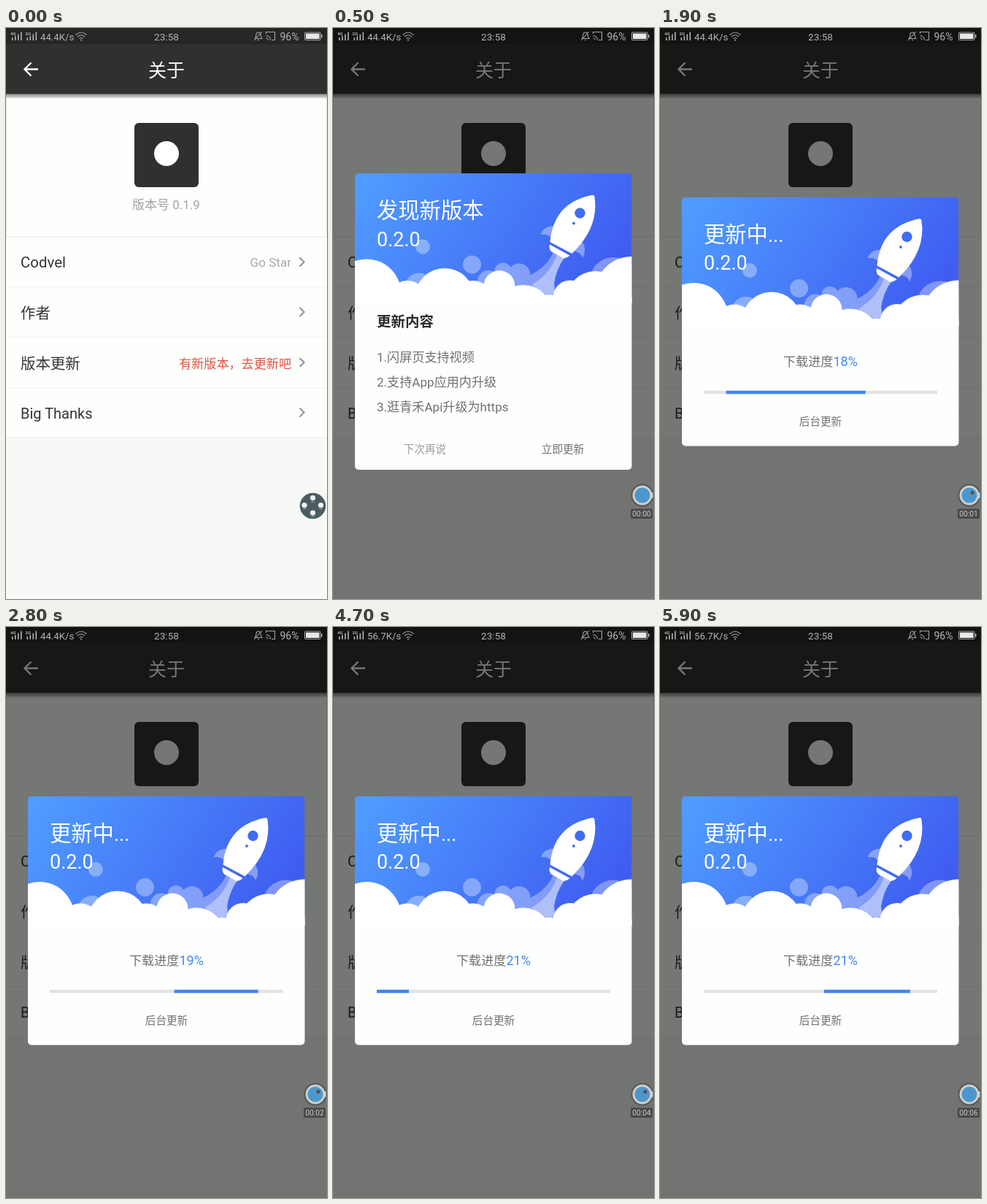
These frames come from a looping animation (440 px wide and 782 px high, 6000 ms). An HTML page:

```html
<!DOCTYPE html>
<html lang="zh-CN">
<head>
<meta charset="utf-8">
<title>关于</title>
<style>
  html, body { margin: 0; width: 100%; height: 100%; overflow: hidden; background: #f7f9f6; }
  svg { display: block; width: 440px; height: 782px; }
  text { font-family: Roboto, "Noto Sans CJK SC", "Noto Sans CJK", sans-serif; white-space: pre; }
  .row { font-size: 20.4px; fill: #333; }
  .note { font-size: 17.1px; }
  .head { font-size: 29.3px; font-weight: 300; fill: #fff; }
  .num { font-size: 27px; font-weight: 400; fill: #fff; }
  .body { font-size: 17.1px; fill: #707070; }
  .btn { font-size: 14.6px; fill: #707070; text-anchor: middle; }
  .status { fill: #b4b4b2; font-size: 13.2px; }
  .tiny { font-size: 6px; font-weight: 700; }
  .end { text-anchor: end; }
  .mid { text-anchor: middle; }
</style>
</head>
<body>
<svg viewBox="0 0 440 782">
  <defs>
    <linearGradient id="sky" x1="0" y1="0.2" x2="1" y2="0.5">
      <stop offset="0" stop-color="#4f9bff"/>
      <stop offset="1" stop-color="#3f5df1"/>
    </linearGradient>
    <linearGradient id="shade" x1="0" y1="0" x2="0" y2="1">
      <stop offset="0" stop-color="#000" stop-opacity=".48"/>
      <stop offset="1" stop-color="#000" stop-opacity="0"/>
    </linearGradient>
    <clipPath id="headClip"><path d="M30 376V204a5 5 0 0 1 5-5H404.500a5 5 0 0 1 5 5V376z"/></clipPath>
    <clipPath id="trackClip"><rect x="60" y="496.500" width="320" height="5"/></clipPath>
    <path id="chevron" d="M402.500 -6l6 6l-6 6" fill="none" stroke="#999" stroke-width="2.300"/>
    <g id="bars">
      <rect y="13" width="1.600" height="4"/>
      <rect x="4" y="11" width="1.600" height="6"/>
      <rect x="8" y="8.500" width="1.600" height="8.500"/>
      <rect x="12" y="5.500" width="1.600" height="11.500"/>
    </g>
    <g id="banner" clip-path="url(#headClip)">
      <rect x="30" y="199" width="379.500" height="170" fill="url(#sky)"/>
      <g fill="#fff" opacity=".34">
        <circle cx="123" cy="299.500" r="10"/>
        <circle cx="190.500" cy="324" r="12.500"/>
        <circle cx="118" cy="355" r="19.500"/>
        <circle cx="213" cy="347" r="15"/>
        <circle cx="233" cy="333" r="11.500"/>
        <circle cx="255" cy="338" r="15.500"/>
        <circle cx="384" cy="346" r="32"/>
        <path d="M302 307Q290 335 250 346L262 362L297 368Q306 364 303 350Q306 330 317 315z"/>
      </g>
      <g fill="#fff" fill-opacity=".36">
        <path d="M307 310Q299 336 272 352L297 368Q306 364 303 350Q306 330 317 315z"/>
        <path d="M304 271Q288 271 285 283Q293 281 299 287z"/>
        <path d="M340 290Q349 302 342 315Q340 307 331 306z"/>
      </g>
      <g fill="#fff">
        <path d="M354 229Q358 228 358.500 231Q365 273 327.500 309L297.500 293Q302 240 354 229z"/>
        <path d="M297 296.500L324.500 311.500Q321 315 316 315.500L299 306Q295.500 302 297 296.500z"/>
        <circle cx="46" cy="364" r="47.500"/>
        <circle cx="102" cy="374" r="28"/>
        <circle cx="153" cy="370" r="41"/>
        <circle cx="192" cy="374" r="28"/>
        <circle cx="228" cy="353.500" r="21.500"/>
        <circle cx="261" cy="392" r="40"/>
        <circle cx="325" cy="369" r="23.500"/>
        <circle cx="360" cy="374" r="41"/>
        <circle cx="409" cy="363" r="50"/>
        <rect x="30" y="365.500" width="380" height="12"/>
      </g>
      <g fill="#3f6cf3">
        <circle cx="338.500" cy="253.500" r="7.200"/>
        <circle cx="330" cy="267.500" r="1.900"/>
      </g>
    </g>
  </defs>

  <rect width="440" height="782" fill="#f7f9f6"/>
  <rect y="90" width="440" height="471" fill="#fdfffd"/>
  <rect x=".5" y="94.500" width="439" height="191.500" fill="none" stroke="#e6e7e5"/>
  <path d="M0 354.500H440M0 423.500H440M0 492.500H440M0 561H440" stroke="#eef0ee"/>
  <rect y="90.500" width="440" height="6.500" fill="url(#shade)"/>
  <rect width="440" height="90.500" fill="#30312f"/>
  <rect width="440" height="22" fill="#262725"/>
  <path d="M44 56.500H26M34.500 47.500L25.500 56.500L34.500 65.500" fill="none" stroke="#fff" stroke-width="2.400"/>
  <text class="mid" x="220" y="66.500" font-size="25" font-weight="300" fill="#fff">关于</text>
  <rect x="176" y="130" width="88" height="88" rx="6" fill="#30312e"/>
  <circle cx="220" cy="172" r="17" fill="#fff"/>
  <text class="mid" x="219.500" y="248" font-size="17" fill="#a2a2a2">版本号 0.1.9</text>
  <text class="row" x="20" y="328">Codvel</text>
  <text class="row" x="20" y="398">作者</text>
  <text class="row" x="20" y="467">版本更新</text>
  <text class="row" x="20" y="535" style="font-size:20px">Big Thanks</text>
  <text class="note end" x="391" y="327" fill="#a8a8a8">Go Star</text>
  <text class="note end" x="391" y="466" fill="#e5503f">有新版本，去更新吧</text>
  <use href="#chevron" y="320.500"/>
  <use href="#chevron" y="389"/>
  <use href="#chevron" y="458"/>
  <use href="#chevron" y="526.500"/>

  <rect id="dim" width="440" height="782" fill="#010501"/>

  <g class="status">
    <text class="tiny" x="6" y="10">4G</text>
    <text class="tiny" x="26.500" y="10">2G</text>
    <use href="#bars" x="8"/>
    <use href="#bars" x="28.500"/>
    <text id="speed" x="47" y="16.500">44.4K/s</text>
    <text class="mid" x="220" y="17" style="font-size:13.600px">23:58</text>
    <text x="375.500" y="16.500" style="font-size:14px">96%</text>
    <g fill="none" stroke="#a4a4a2" stroke-width="1.100">
      <path d="M95.500 9.500Q103 2.500 110.500 9.500M98 12Q103 7.500 108 12M100.500 14.500Q103 12.500 105.500 14.500"/>
      <path d="M341 14.500H351Q349 12 349 9Q348.500 6 346 6Q343 6 343 9Q343 12 341 14.500M340 17L351 5M345 16.500H347"/>
      <path d="M356.500 8V5.500H368.500V16.500H364M356.500 10.500Q362 11 362.500 16.500M356.500 13.500Q359 14 359.500 16.500"/>
      <rect x="409.500" y="6" width="21.500" height="10.500" rx="1.500"/>
    </g>
    <rect x="411" y="7.500" width="18.500" height="7.500" fill="#e8e8e6"/>
    <rect x="432" y="9" width="1.500" height="4.500"/>
    <circle cx="103" cy="16.500" r="1"/>
  </g>

  <g id="offer">
    <path d="M30 370H409.500V600a5 5 0 0 1 -5 5H35a5 5 0 0 1 -5 -5z" fill="#fdfffd"/>
    <use href="#banner"/>
    <text class="head" x="60" y="260">发现新版本</text>
    <text class="num" x="60" y="298.500">0.2.0</text>
    <text x="60" y="408.500" font-size="19.500" font-weight="700" fill="#2a2a2a">更新内容</text>
    <text class="body" x="60" y="456.500">1.闪屏页支持视频</text>
    <text class="body" x="60" y="490.500">2.支持App应用内升级</text>
    <text class="body" x="60" y="525">3.逛青禾Api升级为https</text>
    <g id="tap">
      <rect x="220" y="554" width="189.500" height="43" fill="#f5f7f5"/>
      <circle cx="316" cy="584" r="3.500" fill="#c9cbc9"/>
    </g>
    <text class="btn" x="126" y="582" style="fill:#9c9c9c">下次再说</text>
    <text class="btn" x="315" y="582">立即更新</text>
  </g>

  <g id="load">
    <path d="M30 402H409.500V567.500a5 5 0 0 1 -5 5H35a5 5 0 0 1 -5 -5z" fill="#fdfffd"/>
    <use href="#banner" y="32.500"/>
    <text class="head" x="60" y="292.500">更新中<tspan class="num">...</tspan></text>
    <text class="num" x="60" y="331">0.2.0</text>
    <text class="body" x="169" y="463">下载进度</text>
    <text id="percent" x="237.500" y="463" font-size="18" fill="#4285f4"></text>
    <g clip-path="url(#trackClip)">
      <rect x="60" y="496.500" width="320" height="5" fill="#e3e3e3"/>
      <rect id="barA" y="496.500" height="5" fill="#4285f4"/>
      <rect id="barB" y="496.500" height="5" fill="#4285f4"/>
    </g>
    <text class="btn" x="220" y="543.500">后台更新</text>
  </g>

  <g id="ball">
    <circle cx="420.500" cy="654.500" r="17.800" fill="#4b5d60"/>
    <g fill="#f2f5f4">
      <circle cx="420.500" cy="643.500" r="3.600"/>
      <circle cx="409" cy="653.500" r="3.600"/>
      <circle cx="431.500" cy="653.500" r="3.600"/>
      <circle cx="420.500" cy="664" r="3.600"/>
    </g>
    <path d="M418.500 649H422.500M407 658.500H411M429.500 658.500H433.500M418.500 669H422.500" stroke="#a9b4b4"/>
  </g>
  <g id="rec">
    <circle cx="424" cy="640" r="15.500" fill-opacity=".25"/>
    <rect x="434" y="636" width="4.500" height="8" rx="1" fill="#dfe1df"/>
    <circle cx="424" cy="640" r="12" fill="#4b97cd" stroke="#cdcfcb" stroke-width="3"/>
    <circle id="dot" cx="428" cy="636.500" r="2.500" fill="#5b4a48"/>
    <rect x="408" y="658.500" width="30" height="13.500" rx="2" fill-opacity=".36"/>
    <text id="clock" class="mid" x="423" y="669" font-size="10.300" fill="#c8cac8"></text>
  </g>
</svg>
<script>
const $ = id => document.getElementById(id);
const clamp = v => Math.min(1, Math.max(0, v));
const show = (id, on) => $(id).style.display = on ? '' : 'none';

function bezier(x1, y1, x2, y2, x) {
  const at = (a, b, u) => 3 * (1 - u) ** 2 * u * a + 3 * (1 - u) * u * u * b + u ** 3;
  let lo = 0, hi = 1;
  for (let i = 0; i < 24; i++) {
    const m = (lo + hi) / 2;
    if (at(x1, x2, m) < x) lo = m; else hi = m;
  }
  return at(y1, y2, lo);
}

// Key: [phase, value, easing towards the next key]
function track(keys, p) {
  let i = 0;
  while (i < keys.length - 2 && p >= keys[i + 1][0]) i++;
  const [a, va, ease] = keys[i], [b, vb] = keys[i + 1];
  const k = clamp((p - a) / (b - a));
  return va + (vb - va) * (ease ? bezier(...ease, k) : k);
}

// Indeterminate bars: centre and width as shares of the track
const bars = {
  barA: {
    mid: [[0, -.952], [.2, -.952, [.5, 0, .702, .496]], [.5915, -.115, [.302, .381, .55, .956]], [1, 1.054]],
    size: [[0, .08], [.3665, .08, [.335, .125, .786, 1]], [.6915, .6615, [.06, .11, .6, 1]], [1, .08]]
  },
  barB: {
    mid: [[0, -.049, [.15, 0, .515, .41]], [.25, .328, [.31, .284, .8, .734]], [.4835, .795, [.4, .627, .6, .902]], [1, 1.554]],
    size: [[0, .08, [.205, .057, .577, .454]], [.1915, .457, [.152, .196, .648, 1.004]], [.4415, .728, [.258, -.003, .212, 1.382]], [1, .08]]
  }
};
const pace = [[1400, 0], [2800, .801], [4000, 1.555], [4700, 2.081], [5900, 2.797]];

function draw(t) {
  const loading = t >= 1400;
  $('dim').setAttribute('opacity', .54 * clamp((t - 145) / 300));
  $('offer').setAttribute('opacity', clamp((t - 190) / 275));
  show('offer', !loading);
  show('load', loading);
  show('tap', t >= 1200);
  show('ball', t < 200);
  show('rec', t >= 200);
  show('dot', t >= 1800 && t < 5100);

  const sec = Math.max(0, Math.floor((t - 980) / 820));
  $('clock').textContent = '00:0' + sec;
  $('speed').textContent = t < 3700 ? '44.4K/s' : '56.7K/s';
  $('percent').textContent = 18 + [2200, 3500, 4500].filter(s => t >= s).length + '%';

  const phase = track(pace, t) % 1;
  for (const id in bars) {
    const w = 320 * track(bars[id].size, phase);
    $(id).setAttribute('x', 60 + 320 * track(bars[id].mid, phase) - w / 2);
    $(id).setAttribute('width', w);
  }
}

const start = performance.now();
function tick() {
  const t = (performance.now() - start) % 6000;
  draw(Math.floor(t / 100) * 100);
  requestAnimationFrame(tick);
}
tick();
</script>
</body>
</html>
```
